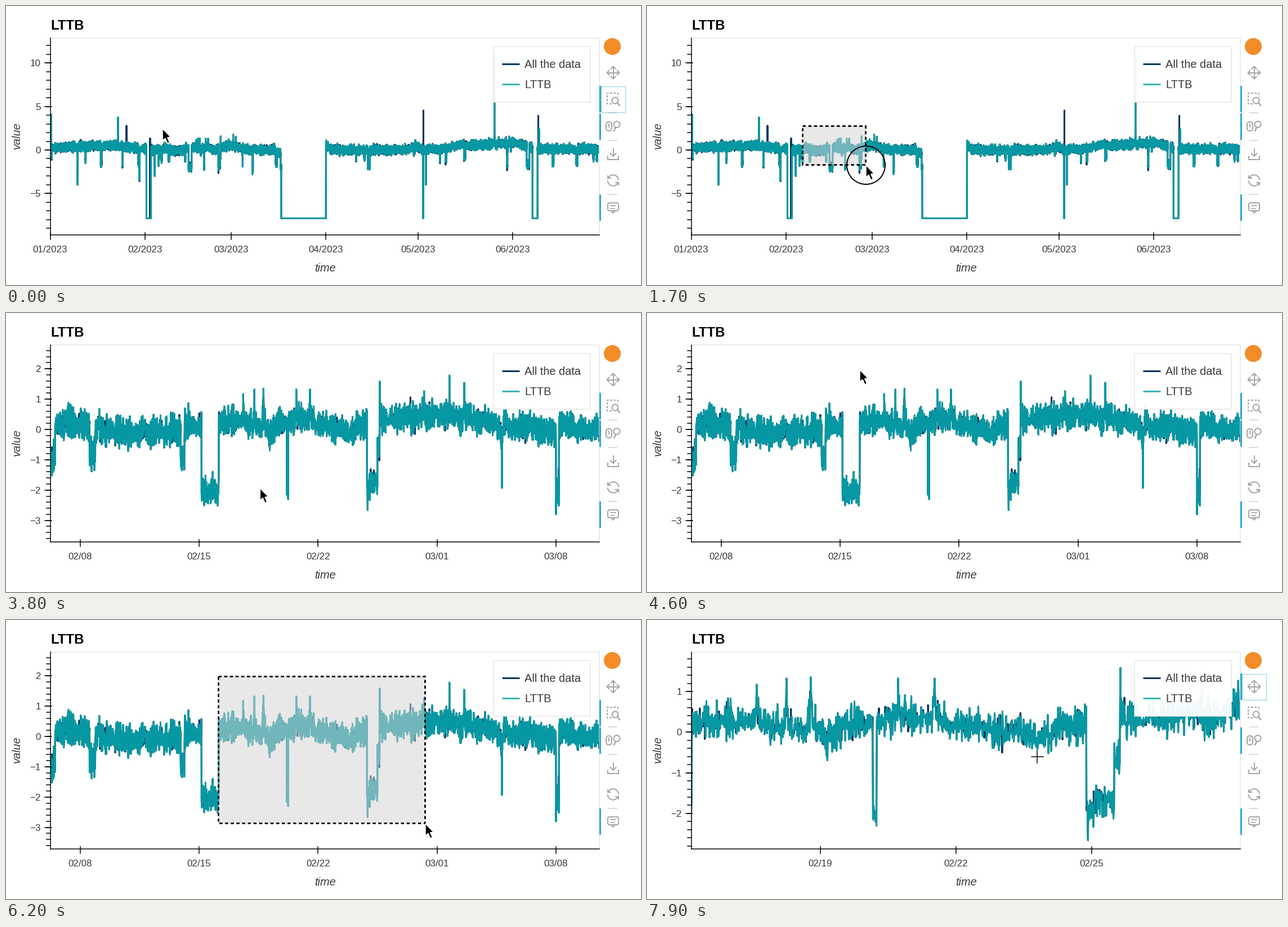
These frames come from a looping animation (1128x496 px, 8000 ms). A matplotlib script:

```python
import matplotlib.pyplot as plt
import numpy as np
from matplotlib.animation import FuncAnimation
from matplotlib.patches import Circle, FancyBboxPatch, Polygon, Rectangle

W, H, DPI = 1128, 496, 72  # at 72 dpi one point is one pixel
FRAMES, STEP = 80, 100
LEFT, RIGHT, TOP, BOTTOM = 78.5, 1054, 56.5, 406.5
PER_DAY = 144
NAVY, TEAL, TEAL_LIGHT = "#003462", "#0698a2", "#3db3b9"
GREY, BLUE, INK, EDGE = "#a1a6a9", "#2fa8d5", "#383838", "#e5e5e5"

plt.rcParams["font.family"] = "Liberation Sans"


class View:
    """Maps days and values to stage pixels for one zoom level."""

    def __init__(self, day0, per_day, zero, unit):
        self.day0, self.per_day = day0, per_day
        self.zero, self.unit = zero, unit

    def x(self, day):
        return LEFT + (day - self.day0) * self.per_day

    def y(self, value):
        return self.zero - value * self.unit

    def day(self, x):
        return self.day0 + (x - LEFT) / self.per_day


WIDE = View(0, 5.443, 256, 15.47)
MID = View(36.245, 30.2, 207, 53.9)
NEAR = View(46.15, 80.4, 199.3, 72.3)

# Slow drift of the signal: (day, value)
DRIFT = [(0, .3), (22, .5), (31, .1), (36.2, -.1), (37, .3), (40.5, -.15),
         (43, 0), (46.3, .3), (49.3, 0), (51, .55), (52.2, .1), (54, -.1),
         (54.8, .3), (58.5, .5), (61, .4), (64.5, 0), (73, 0), (75, -.4),
         (90.2, .5), (92, 0), (117, 0), (119, .6), (121, .1), (128, .1),
         (133, .5), (152, .8), (159, .1), (180, .1)]

# Stretches at a lower level: (first day, last day, value)
OUTAGES = [(31.4, 32.9, -7.85), (38.56, 38.9, -.8), (43.91, 44.14, -1),
           (45.14, 46.16, -2), (50.16, 50.25, -2), (54.88, 55.5, -1.75),
           (55.5, 55.62, -.7), (66, 66.17, -2), (75.4, 90, -7.85),
           (155.5, 156.4, -1.7), (157.4, 159.05, -7.85)]

# Short peaks: (day, value)
PEAKS = [(.3, 4.1), (8.9, -4), (22.1, 3.75), (34.1, -3), (47.6, 1.17),
         (48.26, 1.32), (48.79, 1.35), (50.72, 1.32), (51.53, 1.32),
         (54.92, -2.66), (55.63, 1.58), (59.73, 1.78), (60.6, 1.54),
         (62.81, -1.93), (66, -2.8), (121.7, -7.85), (122.6, -4), (145, 11),
         (159.6, 2.4)]

# Peaks that only the complete series has
HIDDEN = [(24.9, 2.8), (32.6, 1.35), (121.8, 4.55), (159.3, 3.95)]


def make_series():
    rng = np.random.default_rng(7)
    n = int(WIDE.day(RIGHT + 4) * PER_DAY)
    days = np.arange(n) / PER_DAY

    def wander(gap):
        grid = np.arange(0, days[-1] + 2 * gap, gap)
        return np.interp(days, grid, rng.uniform(-1, 1, len(grid)))

    noise = np.clip(rng.normal(0, .22, n), -.5, .55) * (1 + .35 * wander(.2))
    lean = np.interp(days, *np.transpose(DRIFT)) + .12 * wander(.3) + noise

    for day in rng.uniform(0, days[-1], 40):
        width, depth = rng.uniform(.1, .5), rng.uniform(.6, 2)
        if not MID.day0 < day < MID.day(RIGHT):
            lean[(days > day) & (days < day + width)] -= depth
    for first, last, value in OUTAGES:
        inside = (days >= first) & (days < last)
        lean[inside] = value + noise[inside] * (value > -5)
    for day, value in PEAKS:
        i = round(day * PER_DAY)
        lean += (value - lean[i]) * .5 * np.exp(-abs(days - day) / .03)
        lean[i] = value
    full = lean.copy()
    for day, value in HIDDEN:
        full[round(day * PER_DAY)] = value
    return days, full, lean


def lttb(x, y, count):
    """Largest triangle three buckets: indices of the kept points."""
    edges = np.linspace(1, len(x) - 1, count - 1).astype(int)
    ends = np.append(edges, len(x))
    keep = [0]
    for lo, hi, far in zip(ends, ends[1:], ends[2:]):
        a = keep[-1]
        mx, my = x[hi:far].mean(), y[hi:far].mean()
        area = (x[a] - mx) * (y[lo:hi] - y[a]) - (x[a] - x[lo:hi]) * (my - y[a])
        keep.append(lo + int(np.argmax(np.abs(area))))
    return keep + [len(x) - 1]


fig = plt.figure(figsize=(W / DPI, H / DPI), dpi=DPI, facecolor="white")
ax = fig.add_axes([0, 0, 1, 1])
ax.set(xlim=(0, W), ylim=(H, 0))
ax.axis("off")


def line(xs, ys, color=GREY, lw=2, z=3, **kw):
    return ax.plot(xs, ys, color=color, lw=lw, zorder=z, **kw)[0]


def label(x, y, text, size, color=INK, **kw):
    return ax.text(x, y, text, fontsize=size, color=color, va="baseline",
                   zorder=6, **kw)


def rect(x0, y0, x1, y1, z=3, **kw):
    return ax.add_patch(Rectangle((x0, y0), x1 - x0, y1 - y0, zorder=z, **kw))


def bar(y):
    return rect(1053.5, y, 1057, y + 47, fc=BLUE, ec="none")


def ring(x, y, r, color=GREY, lw=2, z=3):
    return ax.add_patch(Circle((x, y), r, fill=False, ec=color, lw=lw, zorder=z))


def rounded(x0, y0, x1, y1, r):
    ax.add_patch(FancyBboxPatch((x0, y0), x1 - x0, y1 - y0, fill=False, ec=GREY,
                                boxstyle=f"round,pad=0,rounding_size={r}",
                                lw=2, zorder=3))


def build_view(view, series, x_ticks, y_major, y_minor):
    """Draws data, ticks and tick labels of one zoom level."""
    i = max(int(view.day0 * PER_DAY) - 1, 0)
    j = int(view.day(RIGHT) * PER_DAY) + 2
    days, full, lean = (values[i:j] for values in series)
    xs = view.x(days)
    keep = lttb(days, lean, min(int(.6 * len(days)), 3000))
    parts = [line(xs, view.y(full), NAVY, 3, 2),
             line(xs[keep], view.y(lean[keep]), TEAL, 3, 2.1)]
    clip = Rectangle((LEFT, TOP), RIGHT - LEFT, BOTTOM - TOP,
                     transform=ax.transData)
    for part in parts:
        part.set_clip_path(clip)
    for day, text in x_ticks:
        x = view.x(day)
        parts += [line([x, x], [403, 415], "black", 1.5),
                  label(x, 438, text, 17, ha="center")]
    low = (view.zero - BOTTOM) / view.unit
    high = (view.zero - TOP) / view.unit

    def ticks(step):
        return range(int(np.ceil(low / step)), int(high / step) + 1)

    for k in ticks(y_minor):
        parts.append(line([72, LEFT], [view.y(k * y_minor)] * 2, "black", 1.5))
    for k in ticks(y_major):
        y = view.y(k * y_major)
        text = str(k * y_major).replace("-", "\u2212")
        parts += [line([69, 81], [y, y], "black", 1.5),
                  label(62, y + 6, text, 17, ha="right")]
    return parts


def build_frame():
    line([LEFT, RIGHT, RIGHT], [TOP, TOP, BOTTOM], EDGE, 1.5, 2.5)
    line([LEFT, LEFT], [TOP, BOTTOM], "black", 1.5)
    line([LEFT, RIGHT], [BOTTOM, BOTTOM], "black", 1.5)
    label(79, 42, "LTTB", 24, "black", weight="bold")
    label(567, 472, "time", 20, style="italic", ha="center")
    label(25, 230, "value", 20, style="italic", ha="center", rotation=90,
          rotation_mode="anchor")
    rect(866, 72, 1038, 171, z=4, fc="white", ec=EDGE, lw=1.5, alpha=.95)
    for y, color, text in ((103, NAVY, "All the data"), (139, TEAL_LIGHT, "LTTB")):
        line([881, 912], [y, y], color, 3, 5, solid_capstyle="butt")
        label(921, y + 7, text, 20)


def build_toolbar():
    ax.add_patch(Circle((1077, 72), 15, fc="#f28c28", ec="none", zorder=3))
    for y in (190, 238.5, 334.5):
        line([1070, 1085], [y, y], "#d0d0d0", 1.5)
    # pan
    cx, cy = 1078.5, 118.5
    line([cx - 10, cx + 10], [cy, cy])
    line([cx, cx], [cy - 10, cy + 10])
    for dx, dy in ((1, 0), (-1, 0), (0, 1), (0, -1)):
        tip = np.array([cx + 11 * dx, cy + 11 * dy])
        back, side = np.array([dx, dy]) * 4, np.array([dy, dx]) * 4
        line(*np.array([tip - back + side, tip, tip - back - side]).T)
    # box zoom
    line([1076, 1068, 1068, 1087, 1087], [174, 174, 155, 155, 161],
         ls=(0, (2, 1.2)))
    ring(1082, 168, 5.5)
    line([1086, 1090], [172, 177], lw=2.4)
    # wheel zoom
    rounded(1066, 206, 1076, 222, 5)
    line([1071, 1071], [210, 215])
    ring(1085, 210.5, 5.5)
    line([1083, 1080], [216, 222], lw=2.4)
    # save
    line([cx, cx], [254, 267])
    line([cx - 5, cx, cx + 5], [262, 267, 262])
    line([1069, 1069, 1088, 1088], [267, 273, 273, 267])
    # reset
    a = np.radians(np.linspace(202, 353, 30))
    for r in (9.7, -9.7):
        line(cx + r * np.cos(a), 310 + r * np.sin(a))
        line(cx - r * np.array([1, 1, .5]), 310 - r * np.array([.87, .37, .37]))
    # hover
    rounded(1069, 350, 1088, 364, 3)
    line([1074, 1083], [355, 355], lw=1.7)
    line([1074, 1081], [359.5, 359.5], lw=1.7)
    line([1075, cx, 1082], [364, 368, 364])
    bar(190.5)
    bar(335)


build_frame()
build_toolbar()
series = make_series()
months = enumerate((0, 31, 59, 90, 120, 151), 1)
weeks = zip(range(38, 67, 7), ("02/08", "02/15", "02/22", "03/01", "03/08"))
views = [
    build_view(WIDE, series, [(d, f"{m:02d}/2023") for m, d in months], 5, 1),
    build_view(MID, series, weeks, 1, .2),
    build_view(NEAR, series, [(30 + d, f"02/{d}") for d in (19, 22, 25)], 1, .2),
]

zoom_bar, pan_bar = bar(142), bar(95)
focus = rect(1056.5, 142.5, 1100, 188.5, fill=False, ec=BLUE, lw=1.2,
             ls=(0, (1.2, 1.2)))
box_fill = rect(0, 0, 1, 1, z=6.5, fc="#d3d3d3", ec="none", alpha=.52)
box_edge = rect(0, 0, 1, 1, z=6.6, fill=False, ec="black", lw=2.8,
                ls=(0, (2, 1.6)))
press_ring = ring(0, 0, 34, "black", 2, 8)
ARROW = np.array([(0, 0), (0, 21.5), (4.9, 17.2), (8.8, 26.2), (12.6, 24.5),
                  (8.8, 15.8), (14.7, 15)])
arrow = ax.add_patch(Polygon(ARROW, fc="black", ec="white", lw=1.6, zorder=9))
cross = [line([0], [0], "black", 1.5, 9) for _ in range(2)]

# Pointer path: time in ms, x, y
PATH = np.array([
    (0, 278, 218), (800, 277, 214), (1700, 389, 283), (2600, 452, 313),
    (4000, 451, 311), (4500, 378, 101), (4700, 378, 101), (5400, 588, 308),
    (6100, 745, 362), (6400, 745, 362), (7300, 1090, 120), (7500, 1090, 120),
    (7900, 693, 243)], float)
# Selections: press, release and zoom time
DRAGS = [(800, 2600, 2700), (4700, 6200, 6300)]
CLICK = 7400


def glide(t, times, values):
    """Monotone cubic interpolation: smooth, and at rest where it turns."""
    gaps = np.diff(times)
    slopes = np.diff(values) / gaps
    a, b = slopes[:-1], slopes[1:]
    tangents = np.zeros(len(times))
    same = a * b > 0
    tangents[1:-1][same] = 2 * a[same] * b[same] / (a + b)[same]
    k = min(np.searchsorted(times, t, "right"), len(gaps)) - 1
    s = (t - times[k]) / gaps[k]
    ease = s * s * (3 - 2 * s)
    bend = tangents[k] * s * (1 - s) ** 2 - tangents[k + 1] * s * s * (1 - s)
    return values[k] + (values[k + 1] - values[k]) * ease + gaps[k] * bend


def pointer(t):
    return np.array([glide(t, PATH[:, 0], PATH[:, k]) for k in (1, 2)])


def draw(frame):
    t = frame * STEP
    x, y = pointer(t)

    current = sum(t >= zoom for _, _, zoom in DRAGS)
    for k, parts in enumerate(views):
        for part in parts:
            part.set_visible(k == current)

    pan = t >= CLICK
    on_pan = t >= CLICK - STEP
    zoom_bar.set_visible(not pan)
    pan_bar.set_visible(pan)
    focus.set_visible(t < DRAGS[0][0] or on_pan)
    focus.set_y(95.5 if on_pan else 142.5)

    pressed = t in (CLICK, CLICK + STEP)
    dragging = False
    for press, release, zoom in DRAGS:
        pressed |= press <= t < release
        if press < t < zoom:
            dragging = True
            corner = pointer(press) - 1
            for box in (box_fill, box_edge):
                box.set_bounds(*corner, *((x, y) - corner - 1))
    box_fill.set_visible(dragging)
    box_edge.set_visible(dragging)
    press_ring.set_visible(pressed)
    press_ring.center = (x, y)

    crosshair = pan and x < RIGHT
    arrow.set_visible(not crosshair)
    arrow.set_xy(ARROW + (x, y))
    cross[0].set_data([x - 10.5, x + 10.5], [y, y])
    cross[1].set_data([x, x], [y - 10.5, y + 10.5])
    for part in cross:
        part.set_visible(crosshair)
    return []


anim = FuncAnimation(fig, draw, frames=FRAMES, interval=STEP, repeat=True)
plt.show()
```
